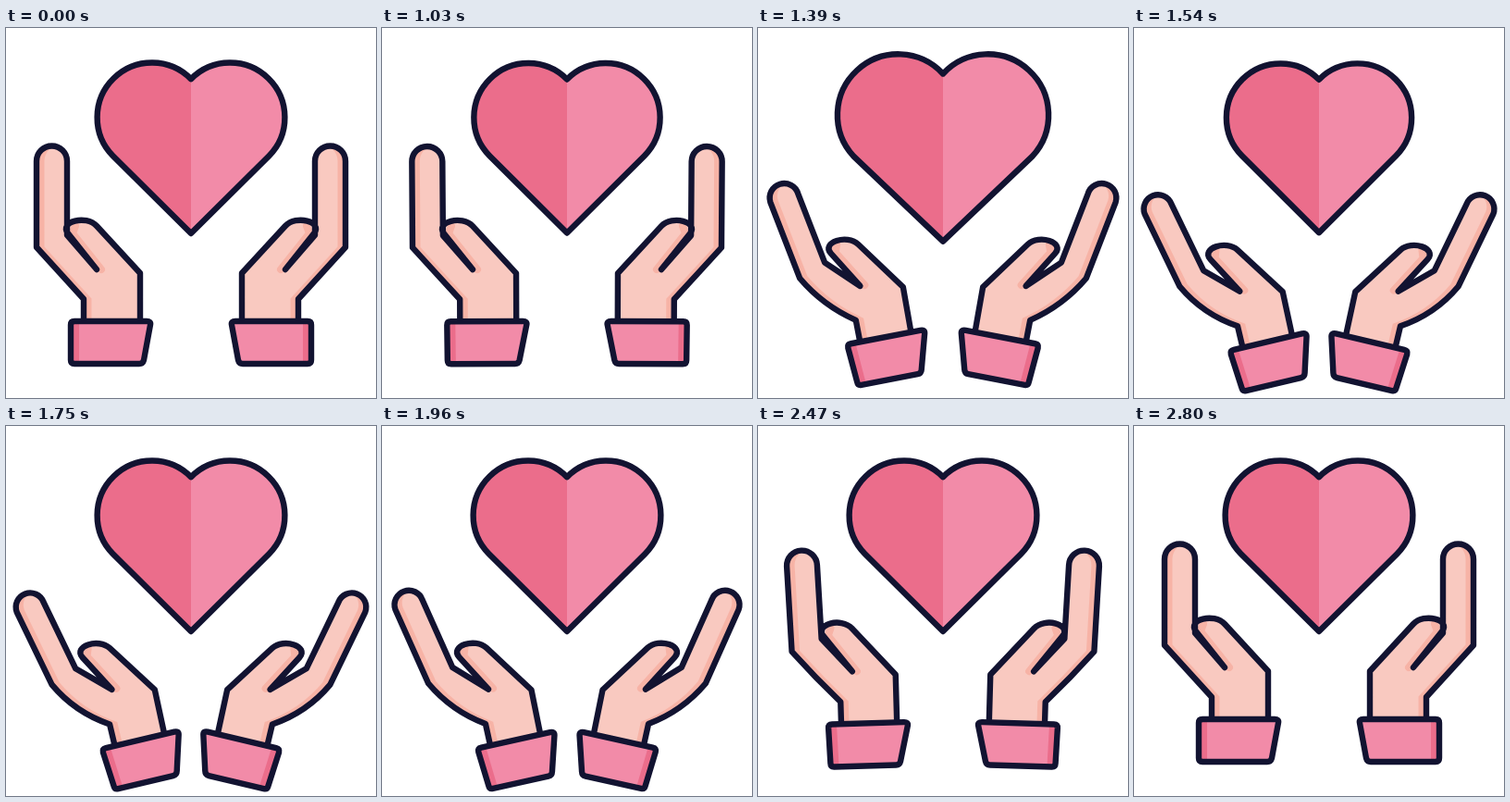
These frames come from a looping animation (400 px wide and 400 px high, 2830 ms). An HTML page:

```html
<!DOCTYPE html>
<html lang="en">
<head>
<meta charset="utf-8">
<title>Caring hands</title>
<style>
  html, body { margin: 0; width: 100%; height: 100%; overflow: hidden; background: #fff; }
  svg { display: block; width: 100%; height: 100%; }
  .line { fill: none; stroke: #121331; stroke-width: 6.4; stroke-linecap: round; stroke-linejoin: round; }
  .pink { fill: #f28ba8; }
  .rose { fill: #eb6d8b; }
  .skin { fill: #f9c9c0; }
  .shade { fill: #f7b3a6; }
  .crease { fill: none; stroke: #f7b3a6; stroke-width: 8; stroke-linecap: round; stroke-linejoin: round; }
</style>
</head>
<body>
<svg viewBox="0 0 400 400">
  <defs><clipPath id="inside"><path id="clip"/></clipPath></defs>
  <path id="heartLeft" class="rose"/>
  <path id="heartRight" class="pink"/>
  <path id="heartLine" class="line"/>
  <g id="hand">
    <path id="base" class="shade"/>
    <g clip-path="url(#inside)">
      <path id="light" class="skin" transform="translate(8.5 -.5)"/>
      <path id="crease" class="crease" transform="translate(5 0)"/>
    </g>
    <path id="outline" class="line"/>
    <path id="cuff" class="pink"/>
    <path id="fold" class="rose"/>
    <path id="cuffLine" class="line"/>
  </g>
  <use href="#hand" transform="matrix(-1 0 0 1 400 0)"/>
</svg>
<script>
const LOOP = 2830;
const set = (id, value, name = 'd') => document.getElementById(id).setAttribute(name, value);

// Smooth step from 0 to 1 between two times.
function ease(t, from, to) {
  const u = Math.min(1, Math.max(0, (t - from) / (to - from)));
  return u * u * (3 - 2 * u);
}

// Point beyond "to" on the line coming from "from".
function extend(from, to, length) {
  const dx = to[0] - from[0], dy = to[1] - from[1], k = length / Math.hypot(dx, dy);
  return [to[0] + dx * k, to[1] + dy * k];
}

// Tip of a segment that stands on "root" and leans left.
function lean(root, length, degrees) {
  const a = degrees * Math.PI / 180;
  return [root[0] - length * Math.sin(a), root[1] - length * Math.cos(a)];
}

// The hand turns as a whole about the cuff corner while its finger bends.
function drawHand(shift, turn) {
  const at = (x, y, dx = 0, dy = 0) => [x + dx * turn, y + dy * turn];
  const bend = 12.5 * turn;
  const wrist = at(14, -24), knuckle = at(-37, -80), crotch = at(-4, -93, -4, 2);
  const slit = at(28, -56, -3, -4), thumb = at(-3, -95, 5, -6), shoulder = at(28, -103, 5, -1);
  const palm = at(75, -52, -5, 3), end = at(75, 3, -6);
  const bow = at((wrist[0] + knuckle[0]) / 2, (wrist[1] + knuckle[1]) / 2, -8, 7);
  const outer = lean(knuckle, 93 - 6 * turn, bend), inner = lean(crotch, 80, bend);

  const d = `M14 3L${wrist}Q${bow} ${knuckle}L${outer}A15 15 0 0 1 ${inner}L${crotch}L${slit}L${thumb}` +
    `C${extend(slit, thumb, 16)} ${extend(palm, shoulder, 17)} ${shoulder}L${palm}L${end}`;
  for (const id of ['base', 'light', 'clip', 'outline']) set(id, d);
  set('crease', `M${slit}L${thumb}l3 -8`);

  // The lower hem narrows as the hand turns.
  const narrow = Math.sqrt(turn), left = 3 * narrow, right = 78 - 6 * narrow, top = 86 - 2 * turn;
  const cuff = `M4 0H${top - 4}Q${top + 1} 0 ${top} 4L${right + 1} 42Q${right} 46 ${right - 4} 46` +
    `H${left + 4}Q${left} 46 ${left} 42L0 4Q0 0 4 0Z`;
  set('cuff', cuff);
  set('cuffLine', cuff);
  set('fold', `M0 2H9L${left + 9} 44H${left}Z`);
  set('hand', `translate(${70 + 34 * shift} ${317 + 32 * shift}) rotate(${-13.3 * turn})`, 'transform');
}

// s is 0 at full size, 1 when squeezed and negative when swollen.
function drawHeart(s) {
  const cx = 157.8 + 10 * s, cy = 96.7 + 4.3 * s, r = 59.2 - 10.7 * s, tip = 222 - 14 * s;
  const dx = 200 - cx, dy = Math.sqrt(r * r - dx * dx), notch = cy - dy;
  const half = (side, sweep) =>
    `M200 ${notch}A${r} ${r} 0 0 ${sweep} ${200 + side * 2 * dx} ${cy + dy}L200 ${tip}`;
  const left = half(-1, 0), right = half(1, 1);
  set('heartLeft', left + 'Z');
  set('heartRight', right + 'Z');
  set('heartLine', left + right);
}

const start = performance.now();
function draw() {
  const t = (performance.now() - start) % LOOP;
  const shift = ease(t, 1000, 1560) - ease(t, 1900, 2680);
  const turn = ease(t, 990, 1540) - ease(t, 1830, 2660);
  drawHand(shift, turn);
  drawHeart(ease(t, 1000, 1270) - 1.7 * ease(t, 1270, 1410) +
    .77 * ease(t, 1410, 1550) - .07 * ease(t, 1550, 1620));
  requestAnimationFrame(draw);
}
draw();
</script>
</body>
</html>
```
